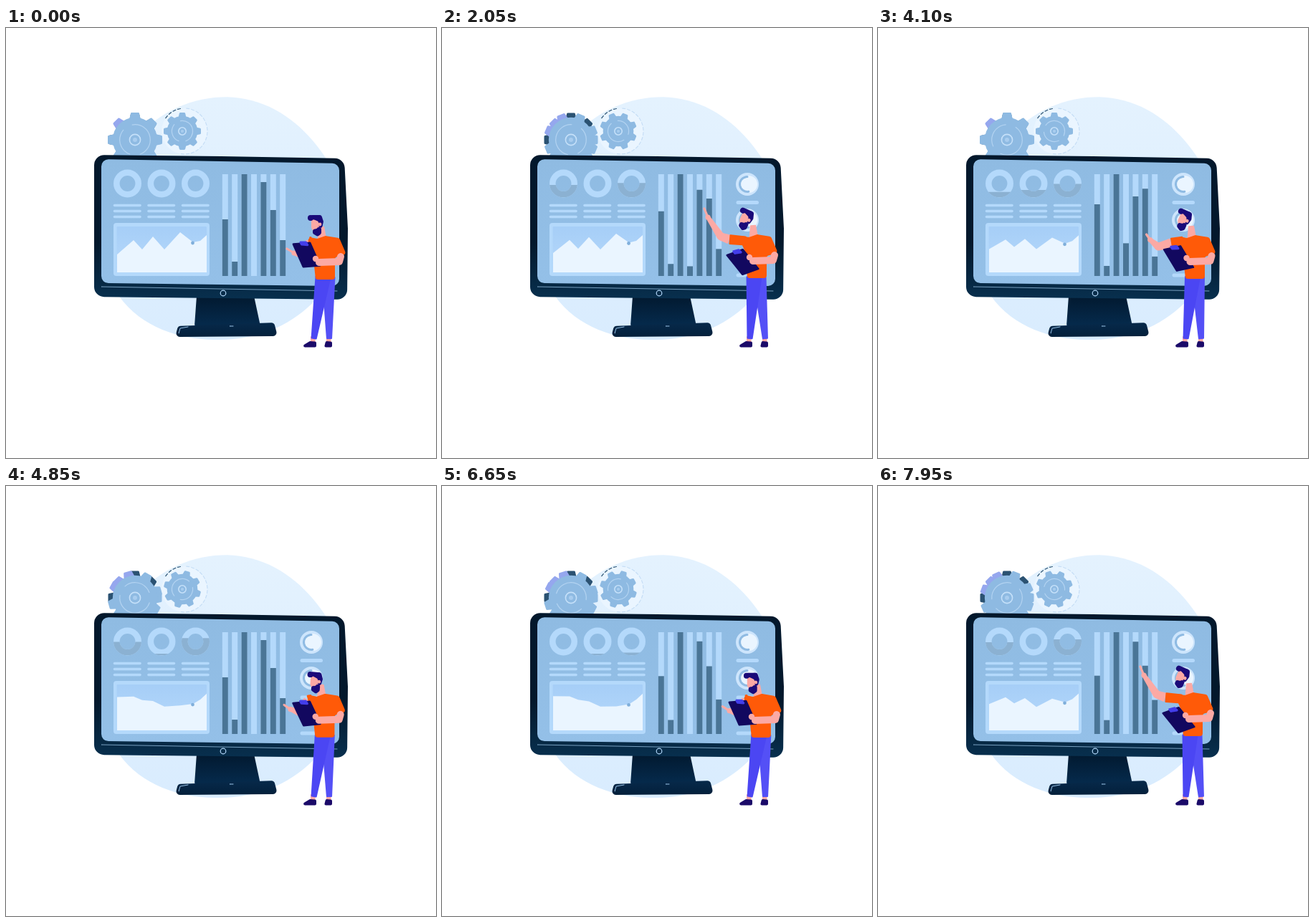
Recreate the animation shown at these times as an HTML page with a canvas. Size 600 by 600 pixels, loop 8 s.

```html
<!DOCTYPE html>
<html lang="en">
<head>
<meta charset="utf-8">
<title>Dashboard presentation</title>
<style>
  html, body { margin: 0; width: 100%; height: 100%; overflow: hidden; background: #fff; }
  canvas { display: block; width: 100vw; height: 100vh; }
</style>
</head>
<body>
<canvas id="stage" width="600" height="600"></canvas>
<script>
const ctx = document.getElementById('stage').getContext('2d');
const LOOP = 8000, TAU = Math.PI * 2, DEG = Math.PI / 180;
const C = {
  navy: '#03203b', pale: '#b4d9fb', white: '#eaf5ff', bar: '#4a7596', level: '#8bb1d2',
  gear: '#8ebae2', trace: '#b3d3f1', violet: '#95a7ee', dark: '#2b5272',
  shirt: '#ff5a08', skin: '#fca9a4', hair: '#1a0a79', jeans: '#4b46f3', shoe: '#1b0a69', board: '#12085f'
};

const clamp = v => Math.min(1, Math.max(0, v));
const mix = (a, b, k) => a + (b - a) * k;
const ease = (t, from, to) => {
  const k = clamp((t - from) / (to - from));
  return k * k * (3 - 2 * k);
};
const wave = (t, period) => (1 - Math.cos(TAU * t / period)) / 2;
// Point on a quadratic curve from a to b, bent towards c.
const bend = (a, c, b, k) => a.map((v, i) => mix(mix(v, c[i], k), mix(c[i], b[i], k), k));

function disc(x, y, r, color) {
  ctx.fillStyle = color;
  ctx.beginPath(); ctx.arc(x, y, r, 0, TAU); ctx.fill();
}
function arc(x, y, r, a, b, color, width) {
  ctx.strokeStyle = color; ctx.lineWidth = width;
  ctx.beginPath(); ctx.arc(x, y, r, a * DEG, b * DEG); ctx.stroke();
}
function line(pts, color, width) {
  ctx.strokeStyle = color; ctx.lineWidth = width;
  ctx.lineCap = ctx.lineJoin = 'round';
  ctx.beginPath(); pts.forEach(p => ctx.lineTo(...p)); ctx.stroke();
}
function shape(pts, r, color) {
  const n = pts.length, last = pts[n - 1];
  ctx.fillStyle = color;
  ctx.beginPath();
  ctx.moveTo((last[0] + pts[0][0]) / 2, (last[1] + pts[0][1]) / 2);
  pts.forEach((p, i) => ctx.arcTo(...p, ...pts[(i + 1) % n], r));
  ctx.closePath(); ctx.fill();
}
function box(x, y, w, h, r, color) {
  ctx.fillStyle = color;
  ctx.beginPath(); ctx.roundRect(x, y, w, h, r); ctx.fill();
}
// Tapered limb between two joints.
function limb(a, b, wa, wb, color) {
  const dx = b[0] - a[0], dy = b[1] - a[1], d = 2 * Math.hypot(dx, dy) || 1;
  const side = (p, w) => [p[0] - dy / d * w, p[1] + dx / d * w];
  shape([side(a, wa), side(b, wb), side(b, -wb), side(a, -wa)], 1, color);
}
function vertical(y0, y1, a, b) {
  const g = ctx.createLinearGradient(0, y0, 0, y1);
  g.addColorStop(0, a); g.addColorStop(1, b);
  return g;
}
function placed(x, y, angle, paint) {
  ctx.save();
  ctx.translate(x, y); ctx.rotate(angle * DEG);
  paint();
  ctx.restore();
}

// A circle pushed out towards the lower left.
function backdrop() {
  ctx.fillStyle = vertical(96, 433, '#e4f2fe', '#d9ecfe');
  ctx.beginPath();
  for (let a = 0; a < 360; a += 3) {
    const c = Math.cos((a - 143) * DEG), r = 168.5 + 5 * c ** 4 + 13 * c ** 5;
    ctx.lineTo(308.5 + r * Math.cos(a * DEG), 264.5 + r * Math.sin(a * DEG));
  }
  ctx.fill();
}

function teeth(x, y, r, turn, colorAt) {
  for (let k = 0; k < 8; k++) {
    const a = (((turn + k * 45) % 360) + 360) % 360;
    placed(x, y, a, () =>
      shape([[r * .7, -r * .22], [r, -r * .15], [r, r * .15], [r * .7, r * .22]], 1.5, colorAt(a)));
  }
}
function gear(x, y, r, turn, colorAt) {
  teeth(x, y, r, turn, colorAt);
  disc(x, y, r * .82, C.gear);
  arc(x, y, r * .56, turn - 100, turn + 70, C.trace, 1.2);
  arc(x, y, r * .56, turn + 110, turn + 220, C.trace, 1.2);
  arc(x, y, r * .2, 0, 360, '#c5e0f9', 1.6);
  disc(x, y, r * .08, '#a9cdef');
}
function gears(t) {
  const turn = t / 455.5 * 45;
  disc(249, 144, 32, C.white);
  ctx.setLineDash([4, 3]);
  arc(249, 144, 32, -85, 100, '#c6def6', 1.2);
  arc(249, 144, 32, -145, -100, C.dark, 1.2);
  ctx.setLineDash([]);
  teeth(180, 156, 37.5, 0, a => a === 225 ? C.violet : a >= 180 ? C.dark : C.gear);
  gear(180, 156, 38, turn, a => a > 190 && a < 260 ? C.violet : C.gear);
  gear(246, 144, 26, -turn, () => C.gear);
}

function monitor() {
  shape([[266, 374], [346, 374], [355, 416], [263, 416]], 2, vertical(376, 412, '#021a31', '#05294a'));
  shape([[240, 416], [374, 411], [379, 430], [236, 431]], 5, vertical(411, 431, '#07294a', C.navy));
  line([[241, 426], [243, 419], [254, 417]], '#9cc4e8', 1);
  line([[312, 416], [317, 416]], '#9cc4e8', 1);
  shape([[123, 177], [300, 179], [472, 182], [477, 280], [476, 379], [300, 377], [123, 375]], 14, vertical(300, 380, '#03182c', '#08304f'));
  shape([[133, 183], [465, 189], [465, 360], [133, 356]], 10, vertical(183, 360, '#8fbbe2', '#94c0e8'));
  line([[133, 361], [462, 367]], '#86aecf', .9);
  arc(303, 370, 3.8, 0, 360, C.pale, 1.2);
}

// Ring whose lower part fills up and drains around a moment of a three second cycle.
function ring(x, t, peak, spread, height) {
  const h = height * Math.cos(clamp(Math.abs(t % 3000 - peak) / spread) * Math.PI / 2);
  arc(x, 217, 15.2, 0, 360, C.pale, 8.6);
  ctx.save();
  ctx.beginPath(); ctx.rect(x - 20, 236.5 - h, 40, h); ctx.clip();
  arc(x, 217, 15.2, 0, 360, C.level, 8.6);
  ctx.restore();
  for (let y = 247.5; y < 265; y += 8) line([[x - 18, y], [x + 17.5, y]], C.pale, 3.6);
}
function rings(t) {
  ring(169.5, t, 1800, 950, 19);
  ring(217, t, 1250, 700, 11);
  ring(264.5, t, 1600, 1050, 26);
}

function areaChart(t) {
  const peaks = [[155, 316], [178, 296], [190, 309], [205, 291], [221, 309], [243, 285], [261, 299], [271, 297], [280, 289]];
  const calm = x => 290 + 21 * Math.sin(Math.PI * ((x - 155) / 125) ** 1.8);
  const k = .9 * wave(t, 1870);
  const top = peaks.map(([x, y]) => [x, mix(y, calm(x), k)]);
  box(150, 272, 134, 74, 4, C.pale);
  box(154.5, 277, 125.5, 64, 1, vertical(277, 325, '#a6cef7', '#b2d6fa'));
  ctx.fillStyle = C.white;
  ctx.beginPath();
  [...top, [280, 341], [155, 341]].forEach(p => ctx.lineTo(...p));
  ctx.fill();
  disc(260.5, top[6][1] + 1, 2.4, '#80afdb');
}

function bars(t) {
  const s = wave(t, 1625);
  const tops = [267 - 21 * s, 326 + 6 * s, 204, 370 - 70 * s, 215 + 20 * s, 254 - 30 * s, 296 + 23 * s];
  tops.forEach((y, i) => {
    const x = 301.8 + i * 13.4;
    box(x, 204, 8, 142, 0, C.pale);
    if (y < 346) box(x, y, 8, 346 - y, 0, C.bar);
  });
}

function widgets(t) {
  ctx.save();
  ctx.globalAlpha = clamp((t - 50) / 350);
  for (const y of [218, 268]) {
    disc(426, y, 16, '#cde5fc');
    disc(428, y, 12, C.white);
    arc(426, y, 10.5, 80, 270, '#8fbbe3', 3);
  }
  for (const y of [243.5, 295, 345]) line([[413, y], [439.5, y]], C.pale, 5);
  ctx.restore();
}

function head() {
  shape([[-5, 1], [7, 1], [8, 19], [0, 21], [-5, 13]], 3, C.skin);
  shape([[-3, 13], [2, 15], [6, 9], [9, 4], [9, 21], [4, 25], [-3, 21]], 3, C.hair);
  shape([[-10, -3], [-4, -5], [9, -5], [12, 4], [10, 13], [6, 13], [5, 4], [-2, 1], [-9, 3]], 3, C.hair);
  disc(-6, -1, 4, C.hair);
  disc(5, -1, 4, C.hair);
  disc(7, 8, 2.4, C.skin);
}
function clipboard() {
  shape([[-20.5, -16], [5.5, -18], [20.5, 16], [-5.5, 18]], 1.5, C.board);
  shape([[-11, -19], [0, -19], [4, -12], [-8, -13]], 1.5, '#433eea');
}
function shoe(x, length) {
  box(x + length - 8, 430, 6.5, 10, 1, C.skin);
  shape([[x, 445.5], [x + length - 9, 437], [x + length, 437.5], [x + length, 445.5]], 2, C.shoe);
}

function man(t) {
  const s = t % 6000;
  const raise = ease(s, 550, 1950) * (1 - ease(s, 2900, 5300));
  const look = clamp(raise * 2.2);

  shoe(410, 23);
  shoe(444, 11);
  limb([450 - 7 * raise, 347], [451, 434], 19, 8, '#5450f6');
  limb([442.5 - 7 * raise, 347], [429.5, 434], 22, 8, C.jeans);

  const cuff = bend([425, 298], [405, 303], [401, 295], raise);
  const elbow = bend([416, 318], [380, 306], [389, 291], raise);
  const wrist = bend([402, 314], [373, 302], [371, 264], raise);
  const tip = bend([392, 308], [370, 296], [366, 252], raise);
  limb(cuff, elbow, 13, 11, C.skin);
  disc(...elbow, 5.3, C.skin);
  limb(elbow, wrist, 11, 6, C.skin);
  disc(...wrist, 3.6, C.skin);
  line([wrist, tip], C.skin, 3.2);

  placed(-6 * raise, -2 * raise, 0, () => {
    limb([440, 277], [441, 296], 8, 13, C.skin);
    shape([[419, 291], [434, 294], [446, 290], [465, 293], [475, 316], [459, 320], [459, 351], [432, 351], [428, 312]], 4, C.shirt);
  });
  limb([428 - 4 * raise, 297], cuff, 13, 14, C.shirt);
  placed(419.5, 316.5 + 10 * raise, -15 * raise, clipboard);
  placed(-3 * raise, -2 * raise, 0, () => {
    line([[467, 319], [465, 326], [437, 327]], C.skin, 10);
    disc(432, 322, 4.2, C.skin);
  });
  placed(431 - 6 * raise, 266 - 6 * look - 2 * raise, 24 * look, head);
}

function draw(t) {
  ctx.fillStyle = '#fff';
  ctx.fillRect(0, 0, 600, 600);
  backdrop();
  [gears, monitor, rings, areaChart, bars, widgets, man].forEach(paint => paint(t));
}

const start = performance.now();
function tick() {
  const t = (performance.now() - start) % LOOP;
  draw(Math.floor(t / 50) * 50);
  requestAnimationFrame(tick);
}
tick();
</script>
</body>
</html>
```
